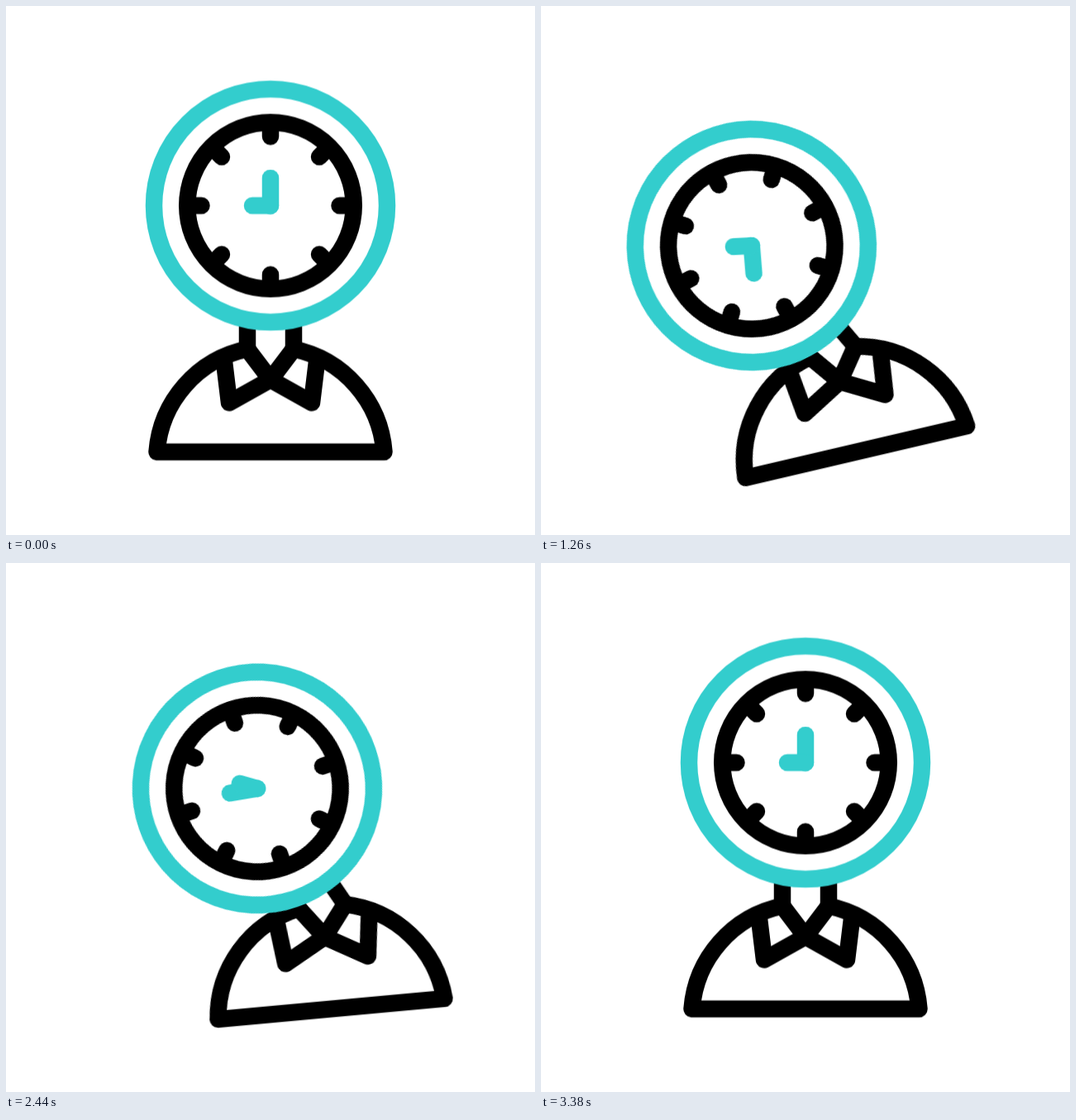
Recreate the animation shown at these times as an HTML page without scripts. Size 640 by 640 pixels, loop 3600 ms.

```html
<!DOCTYPE html>
<html lang="en">
<head>
<meta charset="utf-8">
<title>Clock head</title>
<style>
  html, body { margin: 0; width: 100%; height: 100%; overflow: hidden; background: #fff; }
  svg { display: block; width: 100vw; height: 100vh; }
  .line { fill: none; stroke: #000; stroke-width: 20.5; stroke-linecap: round; stroke-linejoin: round; }
  .teal { stroke: #33cdcd; }
  .disc { fill: #fff; }

  .slide, .lean, .neck, .sway, .nod, .turn, .minute, .hour {
    animation: 3.6s cubic-bezier(.333, 0, .667, 1) infinite;
  }
  .slide { animation-name: slide; }
  .lean { animation-name: lean; }
  .neck { animation-name: neck; }
  .sway { animation-name: sway; }
  .nod { animation-name: nod; }
  .turn { animation-name: turn; }
  .minute { animation-name: minute; }
  .hour { animation-name: hour; }

  /* whole figure, sideways */
  @keyframes slide {
    0%, 8% { transform: translateX(0); }
    44.444%, 71.528% { transform: translateX(73.5px); }
    93.889%, 100% { transform: translateX(0); }
  }
  @keyframes lean {
    0%, 5.556% { transform: rotate(0deg); }
    17.778% { transform: rotate(5deg); }
    33.333% { transform: rotate(-13.2deg); }
    93.889%, 100% { transform: rotate(0deg); }
  }
  @keyframes neck {
    0%, 5.556% { transform: rotate(0deg); }
    17.778% { transform: rotate(1deg); }
    33.333% { transform: rotate(-27deg); }
    52% { transform: rotate(-32deg); }
    69.444% { transform: rotate(-29deg); }
    93.889%, 100% { transform: rotate(0deg); }
  }
  /* head: sideways, vertical, rotation */
  @keyframes sway {
    0%, 5.556% { transform: translateX(0); }
    17.778% { transform: translateX(41px); }
    33.333% { transform: translateX(-127px); }
    55.556% { transform: translateX(-95px); }
    66.667% { transform: translateX(-90px); }
    93.889%, 100% { transform: translateX(0); }
  }
  @keyframes nod {
    0%, 5.556% { transform: translateY(0); }
    17.778% { transform: translateY(2.2px); }
    23.333% { transform: translateY(2.7px); }
    33.333% { transform: translateY(49px); }
    55.556% { transform: translateY(19.5px); }
    66.667% { transform: translateY(31.5px); }
    93.889%, 100% { transform: translateY(0); }
  }
  @keyframes turn {
    0%, 5.556% { transform: rotate(0deg); }
    17.778% { transform: rotate(11.2deg); }
    33.333% { transform: rotate(-28.6deg); }
    55.556% { transform: rotate(-13.5deg); }
    68.889% { transform: rotate(-19deg); }
    93.889%, 100% { transform: rotate(0deg); }
  }
  /* hands run forward, then back */
  @keyframes minute {
    0%, 5.556% { transform: rotate(0deg); }
    59.722% { transform: rotate(360deg); }
    86.111%, 100% { transform: rotate(0deg); }
  }
  @keyframes hour {
    0%, 5.556% { transform: rotate(0deg); }
    59.722% { transform: rotate(45deg); }
    86.111%, 100% { transform: rotate(0deg); }
  }
</style>
</head>
<body>
<svg viewBox="0 0 640 640">
  <defs>
    <path id="bar" d="M0-100V-83.5M0 100V83.5"/>
    <path id="collar" d="M-28-124.5 0-87.5 50-59.5 56-109"/>
  </defs>
  <g class="slide">
    <g transform="translate(320 539.5)">
      <g class="lean line">
        <g transform="translate(-28 -125)"><path class="neck" d="M0 0V-45"/></g>
        <g transform="translate(28 -125)"><path class="neck" d="M0 0V-45"/></g>
        <path d="M-28-124.5A137.9 137.9 0 0 0-137.5 0H137.5A137.9 137.9 0 0 0 28-124.5"/>
        <use href="#collar"/>
        <use href="#collar" transform="scale(-1 1)"/>
      </g>
    </g>
    <g transform="translate(320 241.5)">
      <g class="sway"><g class="nod"><g class="turn line">
        <circle class="teal disc" r="141"/>
        <circle r="100.75"/>
        <use href="#bar"/>
        <use href="#bar" transform="rotate(45)"/>
        <use href="#bar" transform="rotate(90)"/>
        <use href="#bar" transform="rotate(135)"/>
        <path class="minute teal" d="M0 0V-33.5"/>
        <path class="hour teal" d="M0 0H-22"/>
      </g></g></g>
    </g>
  </g>
</svg>
</body>
</html>
```
